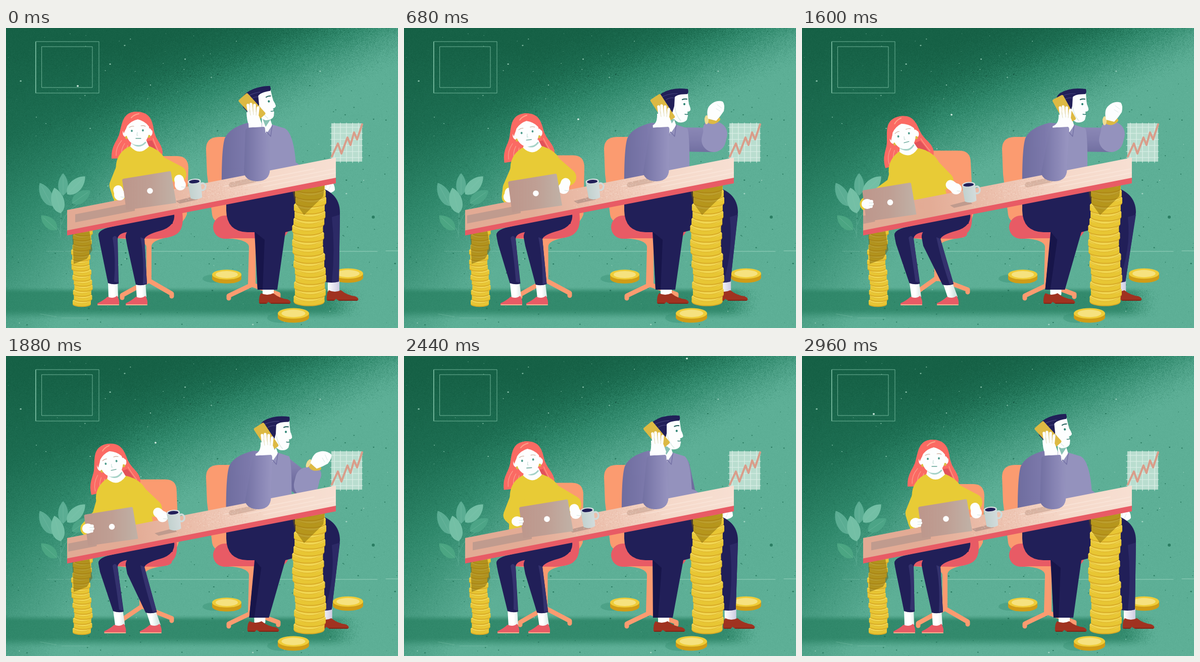
Write an HTML page with a canvas that moves like this. It is 776 px wide and 595 px high and loops after 3 s.

```html
<!DOCTYPE html>
<html lang="en">
<head>
<meta charset="utf-8">
<title>Tilted desk</title>
<style>
html, body { margin: 0; width: 100%; height: 100%; overflow: hidden; background: #55a78c; }
canvas { display: block; }
</style>
</head>
<body>
<canvas id="stage" width="776" height="595"></canvas>
<script>
const W = 776, H = 595, LOOP = 3000, STEP = 40;
const ctx = document.getElementById('stage').getContext('2d');
let g = ctx;
const NAVY = '#211f58', GOLD = '#ddb943', ORANGE = '#fb9b70', RED = '#e85b65',
      WHITE = '#fdfefe', YELLOW = '#e8cb36', LILAC = '#9492bd', PLUM = '#6f6d9f', HAIR = '#fb6a63';

let seed = 7;
const rnd = () => (seed = (seed * 16807) % 2147483647) / 2147483647;
const clamp = (v, a = 0, b = 1) => Math.min(b, Math.max(a, v));
const mix = (a, b, k) => a + (b - a) * k;
const smooth = (a, b, v) => { const k = clamp((v - a) / (b - a)); return k * k * (3 - 2 * k); };

// ---- drawing helpers ----
function fill(d, color) { g.fillStyle = color; g.fill(new Path2D(d)); }
function line(d, color, width) {
  g.strokeStyle = color; g.lineWidth = width; g.lineCap = g.lineJoin = 'round';
  g.stroke(new Path2D(d));
}
function oval(x, y, rx, ry, color, turn = 0) {
  g.fillStyle = color; g.beginPath(); g.ellipse(x, y, rx, ry, turn, 0, 7); g.fill();
}
function box(x, y, w, h, r, color) {
  g.fillStyle = color; g.beginPath(); g.roundRect(x, y, w, h, r); g.fill();
}
function grad(x0, y0, x1, y1, ...stops) {
  const f = g.createLinearGradient(x0, y0, x1, y1);
  stops.forEach((c, i) => f.addColorStop(i / (stops.length - 1), c));
  return f;
}
function placed(x, y, deg, draw) {
  g.save(); g.translate(x, y); g.rotate(deg * Math.PI / 180); draw(); g.restore();
}

// ---- motion: cyclic tracks with monotone easing ----
const KEYS = [0, 680, 1160, 1600, 2120, 2440, 2960];
const tracks = {
  headX: [261, 245, 227, 203, 221, 246], headY: [207, 210, 213, 215, 213, 210],
  tilt: [0, -6, -9, -14, -8, -4], neck: [264, 254, 233, 211, 231, 254],
  chair: [0, 4, 15, 27, 17, 6], footL: [0, 10, 14, 14, 12, 4], footR: [0, 5, 14, 30, 24, 9],
  laptop: [285, 261, 213, 174.5, 252, 283], shade: [137, 125, 121, 121, 127, 136],
  mug: [0, 0, -14, -43, -39, -10],
  handLX: [225, 208, 176, 129, 200, 224], handLY: [331, 335, 340, 349, 334, 328],
  handRX: [345, 316, 272, 305, 314, 340], handRY: [311, 318, 329, 319, 318, 312],
  elbowLX: [219, 210, 197, 182, 191, 211], elbowLY: [312, 317, 312, 310, 322, 316],
  elbowRX: [340, 324, 292, 283, 306, 334], elbowRY: [290, 296, 312, 303, 301, 294],
  manX: [-34, 0, 0, 0, -3, -15], manY: [-4, 0, 0, 0, -1, -2], manTilt: [-9, 0, 0, 0, -1, -3],
  torso: [0, 9, 9, 9, 8, 4], phoneX: [487, 512, 515, 519, 509, 500], phoneY: [157, 160, 161, 162, 160, 158],
  phoneTilt: [48, 57, 58, 61, 52, 50],
  armX: [560, 613, 613, 612, 574, 563], armY: [300, 222, 222, 222, 290, 300],
  wristX: [605, 610, 610, 610, 603, 605], wristY: [312, 188, 188, 190, 266, 308],
  wristTurn: [75, 0, 0, 0, 58, 75],
  shoeL: [0, 0, -3, -23, -23, -7], shoeR: [0, -17, -25, -25, -11, -3]
};
function at(v, t) {
  const n = 6, val = i => v[(i + n) % n];
  const slope = i => { i = (i + n) % n; return (val(i + 1) - val(i)) / (KEYS[i + 1] - KEYS[i]); };
  const tangent = i => { const a = slope(i - 1), b = slope(i); return a * b > 0 ? 2 * a * b / (a + b) : 0; };
  t = Math.min(t, 2960);
  let i = 0;
  while (i < n - 1 && t >= KEYS[i + 1]) i++;
  const d = KEYS[i + 1] - KEYS[i], k = (t - KEYS[i]) / d, q = 1 - k;
  return val(i) * (1 + 2 * k) * q * q + tangent(i) * d * k * q * q
       + val(i + 1) * k * k * (3 - 2 * k) - tangent(i + 1) * d * k * k * q;
}

// ---- still backdrop ----
const shades = [[22, 97, 70], [28, 109, 81], [48, 137, 108], [75, 159, 133], [93, 175, 150]];
function wall() {
  const img = g.createImageData(W, H);
  for (let y = 0, p = 0; y < H; y++) for (let x = 0; x < W; x++, p += 4) {
    const grain = rnd() + rnd() - 1;
    const lo = -85 + x * .1, hi = 85 + Math.max(0, 260 - x) * .7;
    const s = (y + .48 * x - 300 + grain * 34 - lo) / (hi - lo);
    const k = clamp((s + .5) * 2, 0, 3.999), i = Math.floor(k);
    const dark = .85 * smooth(512, 526, y) * (1 - smooth(556, 580, y)) * (1 - smooth(630, 705, x + grain * 20));
    for (let c = 0; c < 3; c++)
      img.data[p + c] = mix(mix(shades[i][c], shades[i + 1][c], k - i), [43, 131, 101][c], dark) + grain * 4;
    img.data[p + 3] = 255;
  }
  g.putImageData(img, 0, 0);
  for (let i = 0; i < 560; i++) {
    const x = rnd() * W, y = rnd() * H, light = y + .48 * x < 310, r = .5 + rnd() * rnd() * 1.4;
    oval(x, y, r, r * .8, light ? (i % 3 ? '#1a5f48' : '#a5d8c3cc') : (i % 9 ? '#1f6f55cc' : '#b5e0cfcc'));
  }
  oval(727, 375, 3, 3, '#2a7d62');
}
function leaf(x, y, len, wide, deg, color) {
  placed(x, y, deg, () => {
    fill(`M0,${-len}C${wide},${-len * .4} ${wide},${len * .7} 0,${len}C${-wide},${len * .7} ${-wide},${-len * .4} 0,${-len}`, color);
    line(`M0,${-len * .7}L0,${len}`, '#8ccab24d', 1);
  });
}
function coin(x, y, rx) {
  const ry = rx * .34;
  oval(x, y + 8, rx, ry, '#d09c16');
  box(x - rx, y, rx * 2, 8, 0, '#d09c16');
  oval(x, y, rx, ry, '#efcc38');
  oval(x, y, rx * .76, ry * .7, '#f6e27f');
}
function backdrop() {
  wall();
  const frame = '#8fcfb5bb';
  line('M59,27H184V129H59Z M71,37H171V118H71Z', frame, 1);
  line('M59,28V128', frame, 1.5);
  line('M80,443H280', '#9bd4bf55', 1);
  line('M285,443H735M752,442H776', '#b5e2d0aa', 1.2);
  line('M68,567L100,573M110,575H165', '#9bd4bf55', 1);
  line('M114,320Q108,360 108,415M150,345Q118,360 110,390M80,390Q105,390 108,410', '#6cb99f77', 1.2);
  leaf(149, 335, 22, 15, 55, '#4ca486');
  leaf(113, 310, 22, 13, 0, '#5bad93');
  leaf(139, 312, 25, 16, 45, '#73bfa5');
  leaf(79, 330, 26, 15, -28, '#5bad93');
  leaf(102, 342, 26, 17, -14, '#73bfa5');
  leaf(85, 386, 21, 14, -48, '#4ba582');
  box(644, 189, 61, 76, 0, '#b9ddcf');
  let grid = '';
  for (let i = 0; i < 5; i++) grid += `M${650 + i * 12},188V267`;
  for (let i = 0; i < 6; i++) grid += `M642,${197 + i * 12}H706`;
  line(grid, '#e6f4eecc', 1.2);
  line('M645,255L657,229L664,249L676,217L682,232L689,207L695,221L705,191', '#d99d8a', 4);
  oval(412, 497, 23, 8, '#2f876955');
  oval(545, 575, 28, 10, '#2f876955');
  coin(437, 489, 29);
  coin(677, 487, 30);
}

// ---- furniture ----
const deskTop = x => 360.5 - (x - 121) * .1945;
function base(x, y, left, right, footY) {
  line(`M${left},${footY + 3}V${footY - 2}L${x},${y}L${right},${footY - 5}V${footY}`, ORANGE, 9);
}
function manChair() {
  fill('M396,240Q396,216 422,216H460V385H424Q410,384 408,370L398,290Z', ORANGE);
  box(410, 372, 150, 46, 23, RED);
  fill('M440,417Q480,420 481,434L479,508H494V434Q496,420 530,417Z', ORANGE);
  base(487, 509, 441, 539, 533);
}
function womanChair(p) {
  const c = p.chair, x = 283 - c * .6, top = 254 - c * .4;
  base(x, 501 - c * .2, 230, 328, 532 - c * .3);
  fill(`M222,417Q${x - 5},421 ${x - 5},434L${x - 5},502H${x + 5}V434Q${x + 4},421 322,415Z`, ORANGE);
  fill(`M${285 - c},${top}H${339 - c}Q${361 - c},${top} ${361 - c},${top + 24}`
    + `L${358 - c * .7},370Q${352 - c * .6},385 ${340 - c * .6},390H${285 - c}Z`, ORANGE);
  fill(`M216,417Q232,400 250,390L${349 - c * .5},366Q${353 - c * .5},396 ${340 - c * .5},407Q330,416 300,418Z`, RED);
}
function stack(x, bottom, count, pitch, rx, sway) {
  for (let i = 0; i < count; i++) {
    const cx = x + sway * (Math.sin(i * 2.3) * .6 + Math.sin(i * .55)), y = bottom - i * pitch;
    const ry = rx * .29, h = pitch * .68;
    oval(cx, y, rx, ry, '#d8aa26');
    box(cx - rx, y - h, rx * 2, h, 0, '#e8c634');
    oval(cx, y - 2, rx, ry, '#e8c634');
    oval(cx, y - h, rx, ry, '#f1d652');
    line(`M${cx - rx * .95},${y - h + 1}Q${cx},${y - h + ry * 2} ${cx + rx * .95},${y - h + 1}`, '#dfb42a', 1);
  }
}
function desk(p) {
  fill('M121,361L653,257V300L121,404Z',
    grad(121, 360, 653, 300, '#e2aa94', '#e3ac96', '#ecc1ae', '#f5d8c9', '#f7dfd2'));
  g.save();
  g.clip(new Path2D('M121,361L653,257V298L121,402Z'));
  for (let i = 0; i < 3; i++) {
    const x = 430 + i * 40, y = deskTop(x) + 14 + i * 8;
    line(`M${x},${y}L${x + 180},${y - 35}`, '#fff3ea55', 2);
  }
  line('M446,311L492,301', '#c7a08e99', 10);
  const s = p.shade, e = p.laptop - 30;
  fill(`M${s},${deskTop(s) + 12}L${e},${deskTop(e) + 12}V${deskTop(e) + 28}L${s},${deskTop(s) + 28}Z`, '#c09b8e');
  const m = 374 + p.mug;
  fill(`M${m - 38},${deskTop(m) + 32}L${m},${deskTop(m) + 22}L${m + 6},${deskTop(m) + 29}L${m - 30},${deskTop(m) + 37}Z`, '#c09b8e');
  seed = 91;
  for (let i = 0; i < 420; i++) {
    const x = 330 + (rnd() + rnd()) * 95;
    oval(x, deskTop(x) + 2 + rnd() * 36, .7, .7, i % 2 ? '#f8e0d399' : '#e0a68f77');
  }
  g.restore();
  fill('M121,401.500L653,297V308L121,411.500Z', RED);
}

// ---- people ----
function womanLegs(p) {
  const a = p.footL, b = p.footR, la = a * .75, lb = b * .7;
  const shoe = x => {
    fill(`M${x - 21},546Q${x - 10},541 ${x - 1},533Q${x + 10},538 ${x + 18},531Q${x + 23},540 ${x + 22},548H${x - 21}Z`, RED);
    line(`M${x - 20},549H${x + 21}`, '#fbb18f', 2);
  };
  const sock = (x, foot) => fill(`M${x - 10},503L${foot + 1},536Q${foot + 12},540 ${foot + 20},533L${x + 9},503Z`,
    grad(x - 10, 0, x + 14, 0, '#fff', '#fff', '#d5e6e2'));
  sock(212 + la, 202 + a); shoe(202 + a);
  sock(267 + lb, 258 + b); shoe(258 + b);
  fill(`M183,412Q181,401 206,395L330,366V388L246,404Q220,406 221,420L${223 + la},507Q${213 + la},510 ${202 + la},506L186,428Z`, NAVY);
  fill(`M211,416Q218,455 ${214 + la},503L${222 + la},505L221,418Q216,408 211,416Z`, '#34326e');
  fill(`M237,416Q235,399 262,392L333,368Q336,393 306,402Q276,410 274,419`
    + `L${279 + lb},508Q${268 + lb},512 ${257 + lb},509L240,432Z`, NAVY);
  fill(`M266,415Q274,455 ${271 + lb},508L${279 + lb},507L274,418Z`, '#34326e');
}
function womanHairBack(p) {
  placed(p.headX, p.headY, p.tilt, () => {
    fill('M-4,-41C-30,-40 -31,-18 -36,0C-40,18 -53,24 -52,52Q-30,52 -10,48L36,60Q49,54 49,38C47,22 36,16 32,-3C29,-24 24,-41 -4,-41Z', HAIR);
    line('M-32,16Q-44,30 -43,46M-26,22Q-34,34 -32,46M-20,26Q-24,36 -22,46M30,12Q34,24 42,40', '#f9a08f', 1.2);
    fill('M-4,20L28,16Q36,30 40,46H-6Z', '#e2525a');
  });
}
function womanBody(p) {
  const x = p.neck, y = 238 + (264 - x) * .14, hip = x * .5 + 128;
  const lean = p.tilt * .75 * Math.PI / 180, co = Math.cos(lean), si = Math.sin(lean);
  // a point given from the neck, turned with the lean of the shoulders
  const q = (dx, dy) => `${x + dx * co - dy * si},${y + dx * si + dy * co}`;
  fill(`M${q(-18, -4)}C${q(-34, 3)} ${q(-44, 16)} ${q(-46, 32)}L${hip - 48},372L${hip + 62},372`
    + `L${q(56, 34)}C${q(50, 12)} ${q(34, 2)} ${q(19, -4)}Z`, YELLOW);
  line(`M${q(-29, 34)}L${p.elbowLX},${p.elbowLY}L${p.handLX},${p.handLY}`, YELLOW, 29);
  line(`M${q(34, 30)}L${p.elbowRX},${p.elbowRY}`, YELLOW, 34);
  fill(`M${q(-14, -17)}L${q(-18, -3)}Q${q(0, 17)} ${q(19, -3)}L${q(13, -17)}Z`, WHITE);
  line(`M${q(-14, -10)}Q${q(0, 2)} ${q(12, -11)}`, '#a5d2c7', 3);
}
function womanHead(p) {
  placed(p.headX, p.headY, p.tilt, () => {
    oval(-24, 1, 6, 8, WHITE); oval(23, 0, 6, 8, WHITE);
    oval(-22, 10, 3, 3, GOLD); oval(22, 8, 3, 3, GOLD);
    fill('M-23,-12C-26,12 -14,25 -1,25C13,25 25,10 22,-12Q0,-40 -23,-12Z', WHITE);
    fill('M-5,-41C-32,-38 -32,-12 -28,2Q-23,-8 -21,-13Q-13,-23 0,-26Q14,-22 21,-13Q25,-7 28,-3C31,-22 20,-42 -5,-41Z', HAIR);
    line('M-13,-29Q-8,-35 2,-37', '#fda58c', 2);
    oval(-12, -3, 1.9, 2.3, '#4f9c8d'); oval(10, -4, 1.9, 2.3, '#4f9c8d');
    line('M-17,-10Q-12,-13 -8,-12M6,-13Q11,-14 15,-12', '#c9a795', 1.1);
    line('M-1,0L-2,6H0', '#b9dad2', 1);
    line('M-4,12H6', '#5fa193', 1.4);
  });
}
function laptop(p) {
  const x = p.laptop, y = 323 + (285 - x) * .207;
  fill(`M${x - 53},${y - 24}L${x + 39},${y - 39}Q${x + 41},${y - 39} ${x + 41.5},${y - 37}L${x + 52},${y + 24}L${x - 47},${y + 38}L${x - 55},${y - 22}Z`,
    grad(x - 50, 0, x + 50, 0, '#bd978c', '#bf9f94', '#c0b1a6'));
  oval(x, y, 5.8, 5.8, WHITE);
}
function hand(ex, ey, x, y) {
  line(`M${mix(ex, x, .5)},${mix(ey, y, .5)}L${x},${y}`, WHITE, 19);
  oval(x, y, 11, 11, WHITE);
  line(`M${x + 2},${y + 4}l8,1`, '#d3e4e0', 1);
}
function mug(p) {
  placed(374 + p.mug, 320 - p.mug * .15, -5, () => {
    g.strokeStyle = '#cfdbda'; g.lineWidth = 3.5;
    g.beginPath(); g.ellipse(15.500, -4, 6, 7, 0, 0, 7); g.stroke();
    fill('M-13,-16L-10,17Q1,23 13,17L13,-16Z', grad(-14, 0, 14, 0, '#c0d0cd', '#d3dcdc'));
    oval(0, -16, 13, 5.2, '#d6dfe0');
    oval(0, -15.500, 10.500, 3.5, NAVY);
  });
}
function manLegs(p) {
  const a = p.shoeL, b = p.shoeR, la = a * .72, lb = b * .75;
  const shoe = (x, y) => {
    fill(`M${x},${y}Q${x - 1},${y - 14} ${x + 4},${y - 20}Q${x + 16},${y - 14} ${x + 28},${y - 20}Q${x + 40},${y - 10} ${x + 56},${y - 8}Q${x + 64},${y - 5} ${x + 62},${y}H${x + 22}L${x + 18},${y - 3}L${x + 16},${y}Z`, '#a03220');
    line(`M${x + 2},${y}H${x + 14}M${x + 24},${y}H${x + 60}`, '#822517', 2);
  };
  box(637 + lb, 500, 23, 24, 2, grad(637 + lb, 0, 662 + lb, 0, '#fff', '#c9c7df'));
  shoe(635 + b, 540);
  fill(`M560,320L605,312Q661,322 661,366L${659 + lb},503Q${645 + lb},507 ${628 + lb},503L612,380Z`, NAVY);
  fill(`M645,375Q652,440 ${645 + lb},504L${659 + lb},503L661,370Z`, '#2c2a66');
  box(508 + la, 515, 22, 15, 2, WHITE);
  shoe(501 + a, 546);
  fill(`M436,340V362Q437,404 478,405H492L${498 + la},519H${537 + la}L553,405L610,390V310Z`, NAVY);
  fill(`M493,405L${498 + la},519H${508 + la}L${512 + la * .4},420Z`, '#17154a');
}
function freeArm(p) {
  const { armX: x, armY: y, wristX: wx, wristY: wy } = p;
  line(`M${540 + p.torso * .5},221L${x - 4},${y}`, grad(0, 196, 0, 250, '#8b88b6', '#807dad', PLUM), 48);
  line(`M${x},${y - 2}L${wx},${wy + 12}`, LILAC, 36);
  line(`M${x},${y}L${x + 3},${y - 12}`, LILAC, 48);
  placed(wx, wy, p.wristTurn, () => {
    line('M-11,-8Q0,4 12,-7', GOLD, 8);
    oval(-11, -6, 4, 9, '#f0dc94');
    fill('M-8,-8Q-13,-28 -3,-36Q8,-46 21,-42Q26,-36 23,-23Q16,-12 8,-4Z', WHITE);
    line('M10,-36l9,7M8,-28l8,5', '#dcebe7', 1);
  });
}
function manBody(p) {
  const o = p.torso, n = o * 1.3;
  fill(`M${478 + n},188C${458 + o},194 ${441 + o},202 ${433 + o},219Q${426 + o},240 ${427 + o},330H574L${574 - o},272`
    + `Q${570 - o * .5},210 ${552 + o},199L${525 + n},191Z`,
    grad(427 + o, 0, 572, 0, PLUM, '#7c79ab', LILAC, LILAC));
  fill(`M${506 + n},175L${507 + n},196L${514 + n},212L${527 + n},193L${520 + n},172Z`, WHITE);
  fill(`M${507 + n},178L${524 + n},181L${514 + n},196Z`, '#8ac2b5');
  line(`M${500 + n},196L${512 + n},215L${516 + n},206L${524 + n},215L${527 + n},193`, '#7572a6', 1.5);
}
function manHead(p) {
  placed(545 + p.manX, 155 + p.manY, p.manTilt, () => {
    fill('M-10,-22L17,-26L18,-12L19,-4Q23,5 22,8Q20,11 16,11L17,19L15,27Q10,34 -2,32Q-12,28 -18,12Z', WHITE);
    fill('M-42,0Q-45,-18 -34,-26Q-14,-38 17,-34Q19,-28 16,-24Q-4,-24 -9,-18L-10,0L-16,20L-34,12Z', NAVY);
    line('M-36,-17Q-24,-25 -4,-25M-26,-13Q-17,-18 -10,-16', '#45427d', 1.2);
    line('M6,-13Q10,-15 15,-14', '#1b5a55', 2);
    oval(10, -4, 2, 2.3, '#2e8474');
    line('M11,16Q14,17 17,16', '#2e7b70', 1.4);
    line('M-9,3Q-6,20 3,29', '#dcebe7', 1.5);
  });
}
function phoneArm(p) {
  const x = p.phoneX, y = p.phoneY, w = 493 + (x - 487) * .5, o = p.torso * .25;
  placed(x, y, p.phoneTilt, () => box(-28, -12, 56, 24, 3, GOLD));
  fill(`M${x - 11},${y + 10}Q${x - 10},${y + 28} ${w - 13},${y + 33}L${w - 12},204H${w + 14}L${x + 19},${y + 32}L${x + 14},${y + 18}L${x + 8},${y + 10}Z`, WHITE);
  [[-8, -4], [-2, -6], [5, -4], [12, 1]].forEach(([dx, dy], i) =>
    line(`M${x + dx},${y + dy}L${x - 5 + i * 5},${y + 20}`, WHITE, 5.5));
  line(`M${x - 5},${y + 4}l2,12M${x + 2},${y + 3}l1,12M${x + 9},${y + 5}l-1,11`, '#dfd9b0', .9);
  fill(`M${w - 19},203Q${w - 18},196 ${w},197L${w + 17},196Q${w + 20},196 ${w + 20},202L${522 + o},272`
    + `Q${526 + o},303 ${498 + o},304Q${476 + o},304 ${471 + o},288Z`,
    grad(470, 0, 525, 0, '#716fa1', '#8582b2', '#9794c0'));
}

const still = document.createElement('canvas');
still.width = W; still.height = H;
g = still.getContext('2d');
backdrop();
g = ctx;

const motes = [[142, 115], [345, 181], [54, 164], [296, 172], [208, 90], [560, 5], [142, 115]];

function render(t) {
  const p = {};
  for (const name in tracks) p[name] = at(tracks[name], t);
  g.drawImage(still, 0, 0);
  const [dx, dy] = motes[KEYS.findLastIndex(k => k <= t)];
  oval(dx, dy, 2, 1.7, '#d5eee3');

  manChair();
  womanChair(p);
  freeArm(p);
  manBody(p);
  manHead(p);
  womanHairBack(p);
  womanBody(p);
  womanHead(p);
  womanLegs(p);
  manLegs(p);

  stack(150, 548, 15, 10, 18, 2.5);
  fill('M131,402H165L171,440L160,458L134,468Z', '#6b520070');
  stack(600, 543, 17, 14, 30.500, 2.5);
  fill('M567,322L631,311L628,334L590,371L572,346Z', '#7a5c0075');
  desk(p);

  const grips = t > 1380;
  hand(p.elbowRX, p.elbowRY, p.handRX, p.handRY);
  if (!grips) hand(p.elbowLX, p.elbowLY, p.handLX, p.handLY);
  laptop(p);
  if (grips) {
    oval(p.handLX, p.handLY, 11, 10, WHITE);
    line(`M${p.handLX + 2},${p.handLY - 5}h7M${p.handLX + 2},${p.handLY}h8M${p.handLX + 2},${p.handLY + 5}h6`, WHITE, 6);
    line(`M${p.handLX + 4},${p.handLY - 2}h7M${p.handLX + 4},${p.handLY + 3}h7`, '#cfe0dc', .9);
  }
  mug(p);
  phoneArm(p);
  coin(569, 566, 31);
}

function tick() {
  render(Math.floor(performance.now() % LOOP / STEP) * STEP);
  requestAnimationFrame(tick);
}
tick();
</script>
</body>
</html>
```
